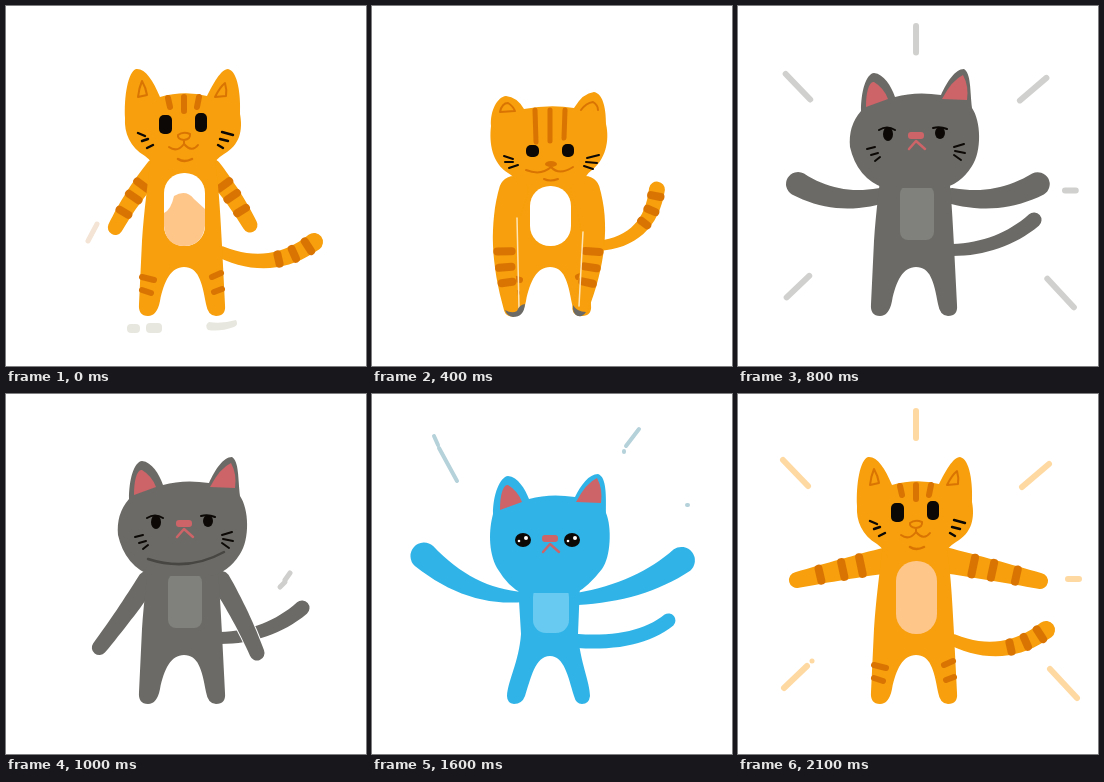
Animation, 360 px wide and 360 px high, one loop 2200 ms. Source, as an HTML page:

```html
<!DOCTYPE html>
<html lang="en">
<head>
<meta charset="utf-8">
<title>Colour-changing cat</title>
<style>
html, body { margin: 0; width: 100%; height: 100%; overflow: hidden; background: #fff; }
svg { display: block; width: 100vw; height: 100vh; }
</style>
</head>
<body>
<svg id="stage" viewBox="0 0 360 360"></svg>
<script>
const STEP = 100;
const ORANGE = '#f79f0c', STRIPE = '#d97403', GRAY = '#6b6a66', BLUE = '#30b4e8';
const PINK = '#cc6468', PEACH = '#ffc68a', INK = '#0b0805';
const COLORS = { tabby: ORANGE, gray: GRAY, blue: BLUE };

const path = (d, fill, extra = '') => `<path d="${d}" fill="${fill}" ${extra}/>`;
const line = (d, color, width = 2) =>
  path(d, 'none', `stroke="${color}" stroke-width="${width}" stroke-linecap="round" stroke-linejoin="round"`);
const oval = (x, y, rx, ry, fill) => `<ellipse cx="${x}" cy="${y}" rx="${rx}" ry="${ry}" fill="${fill}"/>`;
const box = (x, y, w, h, r, fill) =>
  `<rect x="${x}" y="${y}" width="${w}" height="${h}" rx="${r}" fill="${fill}"/>`;
const shift = (dy, content) => `<g transform="translate(0 ${dy})">${content}</g>`;

// A limb is a quadratic curve [x0, y0, cx, cy, x1, y1] with a width at each end.
function pointOn([x0, y0, cx, cy, x1, y1, w0, w1], t) {
  const u = 1 - t;
  const x = u * u * x0 + 2 * u * t * cx + t * t * x1;
  const y = u * u * y0 + 2 * u * t * cy + t * t * y1;
  const angle = Math.atan2(u * (cy - y0) + t * (y1 - cy), u * (cx - x0) + t * (x1 - cx));
  return { x, y, angle, r: (w0 + (w1 - w0) * t) / 2 };
}

function limb(shape, color, edge = '#fff', bars = []) {
  const left = [], right = [];
  for (let i = 0; i <= 16; i++) {
    const { x, y, angle, r } = pointOn(shape, i / 16);
    const dx = Math.sin(angle) * r, dy = Math.cos(angle) * r;
    left.push(`${(x + dx).toFixed(1)} ${(y - dy).toFixed(1)}`);
    right.unshift(`${(x - dx).toFixed(1)} ${(y + dy).toFixed(1)}`);
  }
  const r0 = shape[6] / 2, r1 = shape[7] / 2;
  const d = `M${left.join('L')}A${r1} ${r1} 0 0 1 ${right.join('L')}A${r0} ${r0} 0 0 1 ${left[0]}Z`;
  return path(d, color, `stroke="${edge}" stroke-width="2" paint-order="stroke"`) +
    bars.map(t => bar(shape, t)).join('');
}

function bar(shape, t) {
  const { x, y, angle, r } = pointOn(shape, t);
  const dx = Math.sin(angle) * (r - 3), dy = Math.cos(angle) * (r - 3);
  return line(`M${x + dx} ${y - dy}L${x - dx} ${y + dy}`, STRIPE, 8);
}

const TAILS = {
  curl:  [215, 246, 265, 268, 308, 236, 12, 18],
  high:  [226, 240, 278, 235, 285, 183, 10, 16],
  lift:  [214, 244, 262, 243, 295, 196, 12, 14],
  mid:   [214, 244, 262, 243, 296, 214, 12, 15],
  raise: [205, 247, 255, 240, 285, 198, 12, 15],
  low:   [206, 247, 266, 251, 297, 226, 14, 14]
};

const ARMS = {
  down:       [[150, 162, 126, 190, 109, 222, 20, 15], [205, 162, 228, 190, 244, 219, 20, 15]],
  hang:       [[142, 186, 118, 222, 93, 254, 20, 15], [214, 186, 236, 222, 251, 259, 20, 15]],
  front:      [[142, 185, 124, 235, 140, 303, 28, 14], [213, 185, 231, 235, 208, 303, 28, 14]],
  wide:       [[150, 166, 105, 175, 59, 186, 26, 16], [206, 166, 255, 176, 302, 187, 26, 16]],
  open:       [[142, 190, 98, 200, 60, 178, 16, 24], [214, 190, 260, 200, 300, 178, 16, 24]],
  fly:        [[152, 203, 98, 204, 52, 162, 10, 27], [205, 205, 268, 198, 310, 166, 12, 27]],
  cross:      [[150, 173, 182, 180, 210, 202, 18, 18], [214, 172, 182, 180, 149, 204, 18, 18]],
  fold:       [[180, 201, 200, 208, 218, 203, 10, 18], [132, 184, 172, 199, 208, 185, 20, 14]]
};

function body(kind) {
  return kind === 'blue'
    ? path('M146 190H208L206 240C208 268 218 288 218 302Q217 310 210 310Q204 310 202 302C196 282 192 262 178 262C163 262 159 284 153 302Q150 310 142 310Q135 309 135 302C136 286 147 268 149 240Z', BLUE)
    : path('M145 150H208C212 170 214 200 216 240L219 299Q220 310 210 310Q202 310 200 298C196 275 192 261 178 261C165 261 158 275 154 295Q151 310 142 310Q132 310 133 298L136 235C138 205 142 175 145 150Z', COLORS[kind]);
}

function legBars() {
  return line('M136 271L148 274M136 284L145 287M206 271L215 267M208 286L216 283', STRIPE, 6);
}

// For the tabby, fill is the height at which the peach colour begins.
function belly(kind, fill, low) {
  if (kind === 'gray') return box(162, 180, 34, 54, 8, '#80817c');
  if (kind === 'blue') return box(161, 190, 36, 49, 13, '#68caf0');
  const top = low ? 180 : 167;
  let out = box(158, top, 41, 240 - top, 20, '#fff');
  if (fill <= top) out = box(158, top, 41, 73, 20, PEACH);
  else if (fill < 240) {
    out += path(`M158 220V${fill + 17}Q165 ${fill + 14} 168 ${fill}Q180 ${fill - 7} 188 ${fill + 3}L199 ${fill + 13}V220Q196 240 178 240Q160 240 158 220Z`, PEACH);
  }
  return out;
}

function tabbyHead() {
  return path('M119 112C118 90 122 66 130 63C139 62 147 74 154 91Q178 84 201 90C207 78 215 63 222 63C232 65 235 90 234 108C237 124 234 139 218 148Q208 154 204 164H150Q147 156 139 150C124 141 118 127 119 112Z', ORANGE) +
    line('M132 91Q133 82 136 75Q140 82 141 89ZM209 91Q214 81 219 77Q221 84 220 90Z', STRIPE) +
    line('M162 92L164 101M178 91V105M193 91L191 101', STRIPE, 6) +
    box(153, 109, 13, 19, 5, INK) + box(189, 107, 12, 19, 5, INK) +
    line('M132 127L139 130M136 135L142 133M141 142L147 139M216 126L227 129M214 133L222 135M212 139L217 142', INK, 2.4) +
    line('M172 129Q177 125 184 128Q185 133 178 134Q171 133 172 129M178 134V138Q171 147 163 141M178 138Q186 147 192 139', STRIPE) +
    line('M172 153Q178 157 186 153', STRIPE, 2.5);
}

function tabbyLowHead() {
  return path('M119 120C118 105 125 91 134 90Q145 91 152 103Q178 98 202 102Q211 87 222 86C232 88 234 105 234 118C238 135 233 154 220 164Q213 169 211 178H146Q143 171 136 167C120 157 117 137 119 120Z', ORANGE) +
    line('M128 106Q130 97 136 97Q141 100 143 105ZM209 104Q214 97 221 96Q226 99 226 104', STRIPE) +
    line('M163 104L164 136M178 104V135M193 104L192 132', STRIPE, 5) +
    box(154, 139, 13, 12, 5, INK) + box(190, 138, 12, 13, 5, INK) +
    line('M132 150L141 153M133 156L141 156M137 162L146 159M215 152L227 149M214 156L225 157M212 160L221 163', INK) +
    oval(179, 158, 6, 3, STRIPE) +
    line('M154 164Q169 170 179 161Q187 170 201 161M172 173Q178 176 186 173', STRIPE);
}

function grayHead(jaw) {
  return path('M123 105C123 85 128 68 136 67C146 68 153 80 157 91Q178 85 203 89C209 76 217 63 226 63C233 67 232 85 234 102C243 115 244 145 234 160Q222 179 204 182H146Q119 172 112 141Q110 120 123 105Z', GRAY) +
    ears() + muzzle() +
    oval(150, 128, 5, 7, INK) + oval(202, 127, 5, 6, INK) +
    line('M141 124Q149 119 157 124M195 122Q202 120 209 123', INK) +
    line('M129 143L137 141M133 149L140 147M137 155L142 151M216 141L226 138M217 145L227 147M216 149L223 154', INK) +
    (jaw ? line('M142 165Q182 178 218 158', '#474642', 2.5) : '');
}

function blueHead() {
  return path('M121 105C121 85 128 68 136 67C146 68 153 80 157 90Q178 84 203 88C209 76 217 65 226 65C235 68 234 88 234 104C240 118 239 148 230 160Q216 178 204 184H150Q137 179 125 159C116 142 117 120 121 105Z', BLUE) +
    ears() + muzzle() +
    [151, 200].map(x => oval(x, 131, 8, 7, INK) + oval(x + 3, 129, 2, 2, '#fff') + oval(x - 4, 132, 1.3, 1.3, '#fff')).join('');
}

const ears = () => path('M128 101C128 86 131 75 136 76Q146 82 150 93ZM204 93Q214 74 225 69Q231 80 229 94Z', PINK);
const muzzle = () => box(170, 126, 16, 7, 3, PINK) + line('M171 143L178 135L187 143', PINK, 2.5);

const HEADS = { tabby: tabbyHead, low: tabbyLowHead, gray: grayHead, blue: blueHead };

const streak = (color, width, ...parts) => line(parts.map(p => `M${p[0]} ${p[1]}L${p[2]} ${p[3]}`).join(''), color, width);
const BURST = [[178, 17, 178, 44], [45, 66, 70, 92], [311, 70, 284, 93], [330, 185, 341, 185],
  [312, 275, 339, 304], [46, 294, 69, 272]];
const burst = (color, scale, parts = BURST) => streak(color, 6, ...parts.map(p =>
  p.map((v, i) => (i % 2 ? 165 : 180) + (v - (i % 2 ? 165 : 180)) * scale)));

const EFFECTS = {
  dust: () => streak('#f3e4d5', 5, [82, 235, 91, 218]) +
    box(121, 318, 13, 9, 4, '#e8e7df') + box(140, 317, 16, 10, 4, '#e8e7df') +
    path('M203 316Q216 318 230 314Q233 319 228 321Q214 326 202 324Q198 319 203 316Z', '#e8e7df'),
  puff: () => streak('#fae0bd', 5, [91, 256, 98, 248], [96, 247, 109, 236]) +
    path('M129 320Q140 318 151 320Q154 326 148 329Q139 332 129 330Q124 326 129 320ZM197 321Q210 317 222 319Q227 326 219 330Q206 333 197 331Q192 326 197 321Z', '#e8e7df'),
  grayBurst: () => burst('#d0d0ce', .98),
  grayFade: () => burst('#deddd9', .85, BURST.slice(0, 4)),
  grayTrace: () => streak('#cfcfcd', 5, [274, 193, 279, 188], [279, 186, 284, 179]),
  foldTrace: () => streak('#d2d2cf', 5, [118, 242, 127, 228], [234, 212, 236, 215]),
  blueBurst: () => burst('#b4d5e1', .88, BURST.slice(1, 4)),
  blueTrace: () => streak('#b5d1da', 4, [62, 42, 66, 51], [67, 54, 85, 87], [267, 35, 254, 52], [252, 57, 252, 58], [315, 111, 316, 111]),
  bigBurst: () => burst('#ffd9a0', 1.03) + streak('#ffd9a0', 6, [11, 185, 25, 185]),
  orangeBurst: () => burst('#ffd9a2', 1) + oval(74, 267, 2.5, 2.5, '#ffd9a2')
};

// head, head offset, body, arms, arm colour, tail, belly fill, effect
const POSES = [
  ['tabby', 0, 'tabby', 'down', 'tabby', 'curl', 190, 'dust'],
  ['tabby', 4, 'tabby', 'down', 'tabby', 'curl', 206],
  ['low', -6, 'tabby', 'front', 'tabby', 'curl', 222],
  ['low', 0, 'tabby', 'front', 'tabby', 'high', 240],
  ['low', 0, 'tabby', 'front', 'tabby', 'high', 240, 'tips'],
  ['low', -6, 'gray', 'cross', 'tabby', 'lift', 0],
  ['tabby', 0, 'gray', 'cross', 'tabby', 'lift', 0, 'puff'],
  ['gray', 0, 'gray', 'open', 'gray', 'lift', 0],
  ['gray', 0, 'gray', 'open', 'gray', 'mid', 0, 'grayBurst'],
  ['gray', 0, 'gray', 'open', 'gray', 'mid', 0, 'grayFade'],
  ['gray', 0, 'gray', 'hang', 'gray', 'mid', 0, 'grayTrace'],
  ['gray', 8, 'gray', 'hang', 'gray', 'mid', 0],
  ['gray', 15, 'gray', 'front', 'gray', 'raise', 0],
  ['gray', 15, 'blue', 'fold', 'gray', 'raise', 0, 'foldTrace'],
  ['blue', 15, 'blue', 'fly', 'blue', 'raise', 0],
  ['blue', 15, 'blue', 'fly', 'blue', 'low', 0, 'blueBurst'],
  ['blue', 15, 'blue', 'fly', 'blue', 'low', 0, 'blueTrace'],
  ['blue', 15, 'blue', 'hang', 'blue', 'low', 0],
  ['blue', 15, 'blue', 'front', 'blue', 'low', 0],
  ['blue', 8, 'tabby', 'cross', 'blue', 'curl', 0],
  ['tabby', 0, 'tabby', 'wide', 'tabby', 'curl', 0, 'bigBurst'],
  ['tabby', 0, 'tabby', 'wide', 'tabby', 'curl', 0, 'orangeBurst']
];

function armsFor(name, kind) {
  const crossed = name === 'cross' || name === 'fold';
  const bars = kind !== 'tabby' ? [] : name === 'cross' ? [.3, .52, .75] : name === 'front' ? [.55, .68, .8] : [.3, .5, .75];
  const edge = name === 'fold' ? '#e9e8ff' : name === 'front' ? COLORS[kind] : '#fff';
  return ARMS[name].map(a => limb(a, COLORS[kind], crossed ? edge : edge, bars)).join('');
}

function draw([head, dy, kind, arms, armKind, tail, fill, effect]) {
  const low = head === 'low';
  const armArt = armsFor(arms, armKind);
  const parts = [EFFECTS[effect] ? EFFECTS[effect]() : ''];
  parts.push(limb(TAILS[tail], COLORS[kind], '#fff', kind === 'tabby' ? [.6, .77, .93] : []));
  if (arms === 'down' || arms === 'hang' || arms === 'wide' || arms === 'open' || arms === 'fly') parts.push(armArt);
  parts.push(body(kind));
  if (arms === 'fold') parts.push(path('M130 194Q140 208 150 210L206 214Q222 217 224 205L206 194Z', BLUE));
  if (kind === 'tabby') parts.push(legBars());
  if (arms === 'front') {
    parts.push(armArt, line('M145 212L147 302M211 226L207 300', '#ffe5b5', 1.5));
  }
  parts.push(belly(kind, fill, low));
  if (effect === 'tips') {
    parts.push(path('M133 304Q140 308 145 305Q147 299 153 298Q152 311 141 311Q135 310 133 304ZM201 299Q205 306 214 306Q211 311 206 310Q200 308 201 299Z', GRAY));
  }
  parts.push(shift(dy, HEADS[head](arms === 'hang')));
  if (arms === 'cross' || arms === 'fold') parts.push(armArt);
  return parts.join('');
}

const stage = document.getElementById('stage');
const start = performance.now();
let shown = -1;

function update(now) {
  const index = Math.floor(Math.max(0, now - start) / STEP) % POSES.length;
  if (index !== shown) {
    stage.innerHTML = draw(POSES[index]);
    shown = index;
  }
  requestAnimationFrame(update);
}
update(start);
</script>
</body>
</html>
```
